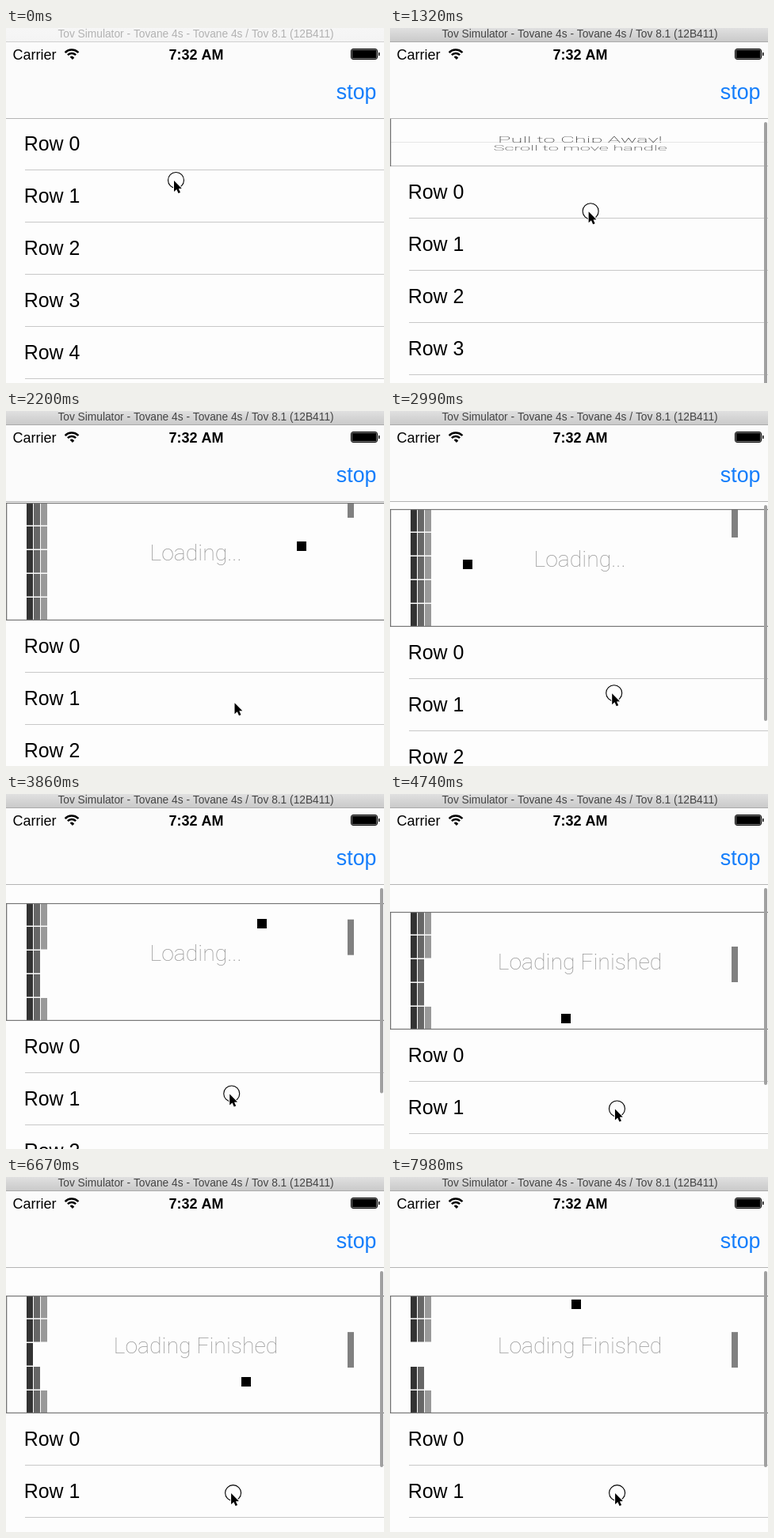
Recreate the animation shown at these times as an HTML page with a canvas. Size 477 by 449 pixels, loop 8000 ms.

```html
<!DOCTYPE html>
<html lang="en">
<head>
<meta charset="utf-8">
<title>Pull to refresh game</title>
<style>
html, body { margin: 0; width: 477px; height: 449px; overflow: hidden; background: #fdfdfd; }
canvas { display: block; }
</style>
</head>
<body>
<canvas id="stage" width="477" height="449"></canvas>
<script>
const c = document.getElementById('stage').getContext('2d');
const W = 477, H = 449, LOOP = 8000, STEP = 87.7;
const PAPER = '#fdfdfd', SANS = '"Liberation Sans", Arial, sans-serif', THIN = 'Roboto, Inter, sans-serif';
const PRESS = 1140, RELEASE = 1640, LAUNCH = 2048, GRAB = 2850, LOADED = 4450;

// 0 before a, 1 after b, linear in between
const ramp = (t, a, b) => Math.min(1, Math.max(0, (t - a) / (b - a)));

// Extra distance the table is dragged while steering the paddle
const drag = t => 8 * ramp(t, GRAB, 2980) + 25 * ramp(t, 2982, 4600) + ramp(t, 5540, 6000);

const pullAt = t => Math.round(165 * ramp(t, 1150, 1600) - 14 * ramp(t, RELEASE, 1840) + drag(t));

function pointerAt(t) {
  const step = ramp(t, 90, 175), rise = ramp(t, 500, 880);
  const pull = ramp(t, 1150, 1620), back = ramp(t, 1950, 2500);
  return [
    212 + 9 * step + 5 * rise + 70 * pull - 17 * back + 0.15 * drag(t),
    193 - 9 * step - 37 * rise + 242 * pull - 45 * back + 1.65 * drag(t)
  ];
}

// Runs the game up to time t; each row loses its bricks from the right
function play(t) {
  const bricks = Array(5).fill(3);
  let x = 423, y = 75, vx = -0.348, vy = -0.136;
  for (let s = LAUNCH; s < t; s++) {
    x += vx;
    y += vy;
    if (y < 9) vy = Math.abs(vy);
    if (y > 141) vy = -Math.abs(vy);
    if (x > 425) vx = -Math.abs(vx);
    const row = Math.floor(y / 30), lead = Math.floor((y + 6 * Math.sign(vy)) / 30);
    if (vx < 0 && x - 6 < 25 + 9 * bricks[row]) {
      bricks[row]--;
      vx = -vx;
      if (lead !== row) { // corner hit between two bricks
        bricks[lead]--;
        vy *= -0.908;
      }
    }
  }
  return { x, y, bricks };
}

function rect(x, y, w, h, color) {
  c.fillStyle = color;
  c.fillRect(x, y, w, h);
}

function text(s, x, y, font, color, align = 'left') {
  c.font = font;
  c.fillStyle = color;
  c.textAlign = align;
  c.fillText(s, x, y);
}

function door(y, shift, label, baseline, size) {
  c.save();
  c.translate(0, shift);
  c.beginPath();
  c.rect(0, y, W, 75);
  c.clip();
  rect(0, y, W, 75, PAPER);
  text(label, 240, baseline, `100 ${size}px ${THIN}`, '#222', 'center');
  c.restore();
}

function gameScene(t, pull) {
  const { x, y, bricks } = play(t);
  rect(0, 0, W, 150, PAPER);
  text(t < LOADED ? 'Loading...' : 'Loading Finished', 239.5, 73, `100 28.4px ${THIN}`, '#959595', 'center');
  bricks.forEach((count, row) => {
    for (let col = 0; col < count; col++) {
      rect(26 + col * 9, row * 30, 8, 28.5, ['#333', '#666', '#999'][col]);
    }
  });
  rect(431, -9 + 2.12 * (pull - 159), 8, 45, '#808080');
  rect(Math.round(x - 6), Math.round(y - 6), 12, 12, '#000');
}

function refreshView(t, pull) {
  const unfold = Math.min(1, pull / 150);
  c.save();
  c.translate(0, pull - 35 + 149 * (1 - unfold));
  c.scale(1, unfold);
  c.beginPath();
  c.rect(0, 0, W, 149);
  c.clip();
  const p = ramp(t, RELEASE, RELEASE + 400);
  gameScene(t, pull);
  if (p < 1) {
    rect(0, 0, W, 150, `rgba(0,0,0,${(1 - p) ** 2})`);
    const open = 75 * (1 - (1 - p) ** 1.5);
    door(0, -open, 'Pull to Chip Away!', 74, 27.3);
    door(75, open, 'Scroll to move handle', 101, 23.7);
  }
  c.strokeStyle = '#777';
  c.lineWidth = 1.4;
  c.strokeRect(0.6, 0.5, 480, 148);
  c.restore();
}

function rows(pull) {
  for (let i = 0; i < 5; i++) {
    const y = 115 + i * 66 + pull;
    text('Row ' + i, 22.7, y + 40, `24.9px ${SANS}`, '#000');
    rect(24, y + 64, W, 1, '#c8c8c8');
  }
}

function header(active) {
  rect(0, 0, W, 114, '#fbfbfb');
  rect(0, 114, W, 1, '#b4b4b4');
  const bar = c.createLinearGradient(0, 0, 0, 17);
  bar.addColorStop(0, active ? '#e0e0e0' : '#f6f6f6');
  bar.addColorStop(1, active ? '#cacaca' : '#f4f4f4');
  rect(0, 0, W, 17, bar);
  rect(0, 17, W, 1, active ? '#aaa' : '#d0d0d0');
  text('Tov Simulator - Tovane 4s - Tovane 4s / Tov 8.1 (12B411)', 239.5, 12,
    `13.75px ${SANS}`, active ? '#444' : '#b2b2b2', 'center');
  text('Carrier', 8.5, 40, `18px ${SANS}`, '#000');
  text('7:32 AM', 240, 40, `bold 18px ${SANS}`, '#000', 'center');
  text('stop', 467.5, 90, `26.8px ${SANS}`, '#157efb', 'right');

  // Signal
  c.strokeStyle = '#000';
  c.lineWidth = 2.5;
  for (const r of [2, 7, 11.5]) {
    c.beginPath();
    c.arc(83, 39, r, -Math.PI * 0.76, -Math.PI * 0.24);
    if (r === 2) c.lineTo(83, 39);
    c.stroke();
  }

  // Battery
  c.lineWidth = 1;
  c.beginPath();
  c.roundRect(435.5, 26.5, 33, 13, 2.5);
  c.stroke();
  rect(436.5, 27.5, 31, 11, '#000');
  rect(470, 31, 1.5, 4, '#000');
}

function scrollBar(pull) {
  c.beginPath();
  c.roundRect(472, 119, 4, 273 - (pull - 159) * 0.96, 2);
  c.fillStyle = '#a0a0a0';
  c.fill();
}

function pointer(t, pressed) {
  c.save();
  c.translate(...pointerAt(t));
  if (pressed) {
    c.beginPath();
    c.arc(2.5, -0.5, 10, 0, 7);
    c.strokeStyle = '#000';
    c.lineWidth = 1.1;
    c.stroke();
  }
  c.beginPath();
  [[0, 0], [0, 14], [3.3, 11], [5.5, 16], [8, 15], [5.8, 10.2], [9.8, 10]].forEach(p => c.lineTo(...p));
  c.closePath();
  c.strokeStyle = '#fff';
  c.lineWidth = 2;
  c.stroke();
  c.fillStyle = '#000';
  c.fill();
  c.restore();
}

function draw(now) {
  const t = Math.floor((now % LOOP + 10) / STEP) * STEP;
  const pull = pullAt(t);
  const dragging = (t >= PRESS && t < RELEASE) || t >= GRAB;
  rect(0, 0, W, H, PAPER);
  rows(pull);
  if (pull > 0) refreshView(t, pull);
  header(t >= PRESS);
  if (dragging && pull > 0) scrollBar(pull);
  pointer(t, dragging || t < 80);
  requestAnimationFrame(draw);
}
requestAnimationFrame(draw);
</script>
</body>
</html>
```
